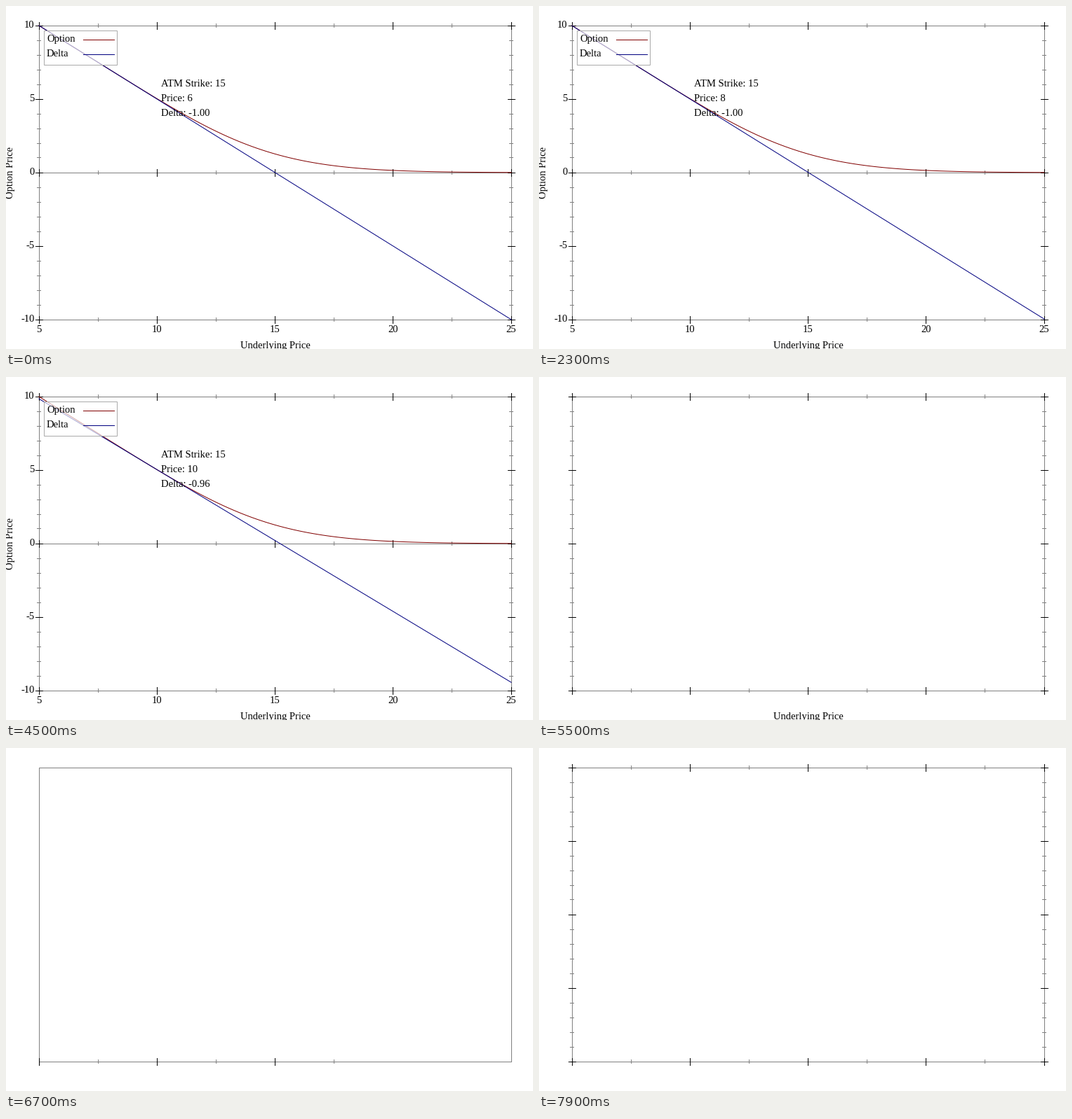
These frames come from a looping animation (751 px wide and 490 px high, 8 s). A matplotlib script:

```python
import math

import numpy as np
import matplotlib.pyplot as plt
from matplotlib.animation import FuncAnimation
from matplotlib.patches import Rectangle

W, H, DPI = 751, 490, 100
PX = 72 / DPI                      # points per pixel
LEFT, RIGHT, TOP, BOTTOM = 47, 720, 28, 448
GRAY, MAROON, NAVY = "#808080", "#800000", "#000080"
STRIKE, VOL = 15, 0.3 * math.sqrt(0.5)

plt.rcParams["font.family"] = "Liberation Serif"
fig = plt.figure(figsize=(W / DPI, H / DPI), dpi=DPI, facecolor="white")
ax = fig.add_axes([0, 0, 1, 1])
ax.set(xlim=(0, W), ylim=(H, 0))
ax.axis("off")

# Drawing order: frame, other ticks, x title, labels, option curve, the rest
BASE, TICKS, XTITLE, LABELS, OPTION, FULL = range(6)
layers = [[] for _ in range(6)]


def sx(x):
    return LEFT + (x - 5) / 20 * (RIGHT - LEFT)


def sy(y):
    return BOTTOM - (y + 10) / 20 * (BOTTOM - TOP)


def line(layer, xs, ys, color, z=2):
    art, = ax.plot(xs, ys, color=color, lw=PX, zorder=z)
    layers[layer].append(art)
    return art


def text(layer, x, y, s, ha="left", z=8, **kw):
    art = ax.text(x, y, s, ha=ha, va="baseline", fontsize=14.67 * PX,
                  color="black", zorder=z, **kw)
    layers[layer].append(art)
    return art


def tick(layer, x, y, vertical, major):
    r = 5 if major else 2.5
    dx, dy = (0, r) if vertical else (r, 0)
    # whole pixels keep the ticks crisp
    line(layer, np.floor([x - dx, x + dx]), np.floor([y - dy, y + dy]),
         "black" if major else GRAY, z=3 if major else 2)


def cdf(x):
    return 0.5 * (1 + math.erf(x / math.sqrt(2)))


def put(s):
    """Price and delta of a put with zero interest."""
    d1 = math.log(s / STRIKE) / VOL + VOL / 2
    price = STRIKE * cdf(VOL - d1) - s * cdf(-d1)
    return price, cdf(d1) - 1


# Frame and ticks
line(BASE, [LEFT, RIGHT, RIGHT, LEFT, LEFT],
     [BOTTOM, BOTTOM, TOP, TOP, BOTTOM], GRAY)
for edge in (BOTTOM, TOP):
    for i in range(9):
        layer = BASE if edge == BOTTOM and i < 6 else TICKS
        tick(layer, sx(5 + 2.5 * i), edge, True, i % 2 == 0)
for edge in (LEFT, RIGHT):
    for v in range(-10, 11):
        tick(TICKS, edge, sy(v), False, v % 5 == 0)

# Titles and labels
text(XTITLE, sx(15), 489, "Underlying Price", "center")
text(LABELS, 10, sy(0), "Option Price", "center", rotation=90,
     rotation_mode="anchor")
for v in range(5, 26, 5):
    text(LABELS, sx(v), 466, str(v), "center")
for v in range(-10, 11, 5):
    text(LABELS, 40.5, sy(v) + 3, str(v), "right")

# Zero axis and the axis ticks along it
line(LABELS, [LEFT, RIGHT], [sy(0)] * 2, GRAY)
for i in range(9):
    tick(LABELS, sx(5 + 2.5 * i), sy(0), True, i % 2 == 0)

# Curves
spots = np.linspace(5, 25, 101)
line(OPTION, sx(spots), [sy(put(s)[0]) for s in spots], MAROON, z=4)
tangent = line(FULL, [LEFT, RIGHT], [TOP, BOTTOM], NAVY, z=5)

# Legend
box = Rectangle((54, 35), 104, 49, fc=(1, 1, 1, 2 / 3), ec="#aaaaaa",
                lw=PX, zorder=6)
layers[FULL].append(ax.add_patch(box))
for i, (name, color) in enumerate((("Option", MAROON), ("Delta", NAVY))):
    text(FULL, 58, 51 + 21 * i, name)
    line(FULL, [110, 154], [48 + 21 * i] * 2, color, z=7)

# Annotation
text(FULL, 221, 115, f"ATM Strike: {STRIKE}")
price_note = text(FULL, 221, 136, "")
delta_note = text(FULL, 221, 157, "")

# Redraws caught halfway: frame -> last finished layer
REDRAWS = {11: OPTION, 22: LABELS, 33: LABELS, 44: LABELS,
           55: XTITLE, 67: BASE, 79: TICKS}


def update(k):
    spot = 6 + sum(k >= start for start in REDRAWS)
    level = REDRAWS.get(k, FULL)
    price, delta = put(spot)
    tangent.set_ydata([sy(price + delta * (x - spot)) for x in (5, 25)])
    price_note.set_text(f"Price: {spot}")
    delta_note.set_text(f"Delta: {delta:.2f}")
    for i, layer in enumerate(layers):
        for art in layer:
            art.set_visible(i <= level)
    return []


anim = FuncAnimation(fig, update, frames=80, interval=100, repeat=True,
                     repeat_delay=0, blit=False)
plt.show()
```
